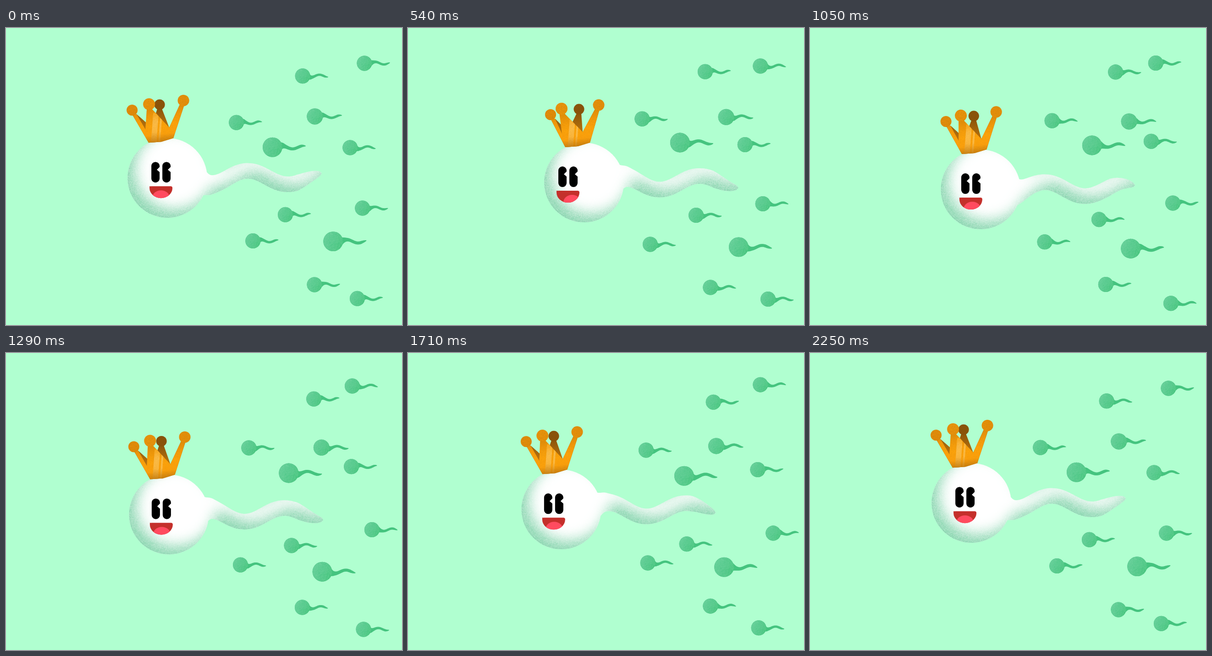
Recreate the animation shown at these times as an HTML page with a canvas. Size 864 by 648 pixels, loop 2280 ms.

```html
<!DOCTYPE html>
<html lang="en">
<head>
<meta charset="utf-8">
<title>Crowned swimmer</title>
<style>
  html, body { margin: 0; width: 100%; height: 100%; overflow: hidden; background: #b0ffd0; }
  canvas { display: block; }
</style>
</head>
<body>
<canvas id="stage" width="864" height="648"></canvas>
<script>
const TAU = Math.PI * 2, W = 864, H = 648, STEP = 30, LOOP = 2280, BEATS = 6;
const ctx = document.getElementById('stage').getContext('2d');
const layer = makeCanvas(W, H).getContext('2d');

function makeCanvas(w, h) {
  return Object.assign(document.createElement('canvas'), { width: w, height: h });
}

const clamp = k => Math.max(0, Math.min(1, k));
const ease = k => clamp(k) ** 2 * (3 - 2 * clamp(k));

// Repeating speckle of one colour with seeded random alpha
function grain(color) {
  const size = 128, g = makeCanvas(size, size).getContext('2d');
  const img = g.createImageData(size, size);
  let seed = 7;
  for (let i = 3; i < img.data.length; i += 4) {
    seed = (seed * 16807) % 2147483647;
    img.data[i] = seed / 2147483647 * 255;
  }
  g.putImageData(img, 0, 0);
  g.globalCompositeOperation = 'source-in';
  g.fillStyle = color;
  g.fillRect(0, 0, size, size);
  return ctx.createPattern(g.canvas, 'repeat');
}
const brownGrain = grain('#a86208'), mintGrain = grain('#8edcb0');

function gradient(x0, y0, x1, y1, ...colors) {
  const g = ctx.createLinearGradient(x0, y0, x1, y1);
  colors.forEach((color, i) => g.addColorStop(i / (colors.length - 1), color));
  return g;
}

function polygon(points) {
  const path = new Path2D();
  points.forEach(([x, y], i) => i ? path.lineTo(x, y) : path.moveTo(x, y));
  path.closePath();
  return path;
}

function grained(path, fill, speckle, strength) {
  ctx.fillStyle = fill;
  ctx.fill(path);
  ctx.globalAlpha = strength;
  ctx.fillStyle = speckle;
  ctx.fill(path);
  ctx.globalAlpha = 1;
}

// Flat elliptical drift shared by all swimmers
function drift(x, y, reach, turns) {
  const a = TAU * turns;
  return [x + reach * Math.cos(a), y + reach / 2 * Math.sin(a + 0.13)];
}

// Round head plus a tail that carries a travelling wave
function swimmer(r, { len, wave, amp, half, neck }, phase) {
  const top = [], bottom = [], x0 = 0.71 * r, n = 70;
  for (let i = 0; i <= n; i++) {
    const x = x0 + (len - x0) * i / n;
    const a = TAU * (x / wave - phase);
    const swing = amp * ease((x - x0) / (0.4 * r)) * (1 - 0.27 * (x / len) ** 3);
    const mid = -swing * Math.cos(a), slope = swing * TAU / wave * Math.sin(a);
    const tip = Math.sqrt(clamp((len - x) / (0.16 * len)));
    const h = half * Math.hypot(1, slope) * tip + 0.52 * r * Math.exp((x0 - x) / neck);
    top.push([x, mid - h]);
    bottom.unshift([x, mid + h]);
  }
  const path = polygon([...top, ...bottom]);
  path.moveTo(r, 0);
  path.arc(0, 0, r, 0, TAU);
  return path;
}

// Centre of drift, delay in turns, optional scale
const crowd = [
  [658, 101, 0.61], [768, 76, 0], [516, 205, 0.55],
  [684, 199, 0.37, 1.06], [599, 259, 0.54, 1.3], [749, 254, 0.77],
  [619, 413, 0.37], [786, 388, 0.65], [525, 465, 0.03],
  [705, 473, 0.17, 1.3], [659, 559, 0], [776, 596, 0.37]
];

function drawSmall([cx, cy, delay, scale = 1], p) {
  const turns = p - delay, r = 16.5;
  const path = swimmer(r, { len: 56, wave: 38, amp: 3, half: 2.5, neck: 4.4 }, BEATS * turns + 0.63);
  const head = new Path2D();
  head.arc(0, 0, r, 0, TAU);
  ctx.save();
  ctx.translate(...drift(cx, cy, 14 * scale, turns));
  ctx.scale(scale, scale);
  ctx.fillStyle = '#45c47f';
  ctx.fill(path);
  grained(head, gradient(-r, -r / 2, r, r / 2, '#60ce96', '#50c889', '#42c47a'), mintGrain, 0.35);
  ctx.restore();
}

function drawBody(x, y, p) {
  const path = swimmer(87, { len: 337, wave: 176, amp: 16, half: 17, neck: 14 }, BEATS * p);
  layer.clearRect(0, 0, W, H);
  layer.save();
  layer.translate(x, y);
  layer.fillStyle = '#78d0a4';
  layer.fill(path);
  layer.globalCompositeOperation = 'destination-out';
  layer.save();
  layer.translate(16, -18);
  layer.filter = 'blur(15px)';
  layer.fill(path);
  layer.restore();
  layer.globalAlpha = 0.4;
  layer.fillStyle = mintGrain;
  layer.fillRect(-100, -100, 460, 200);
  layer.restore();

  ctx.save();
  ctx.translate(x, y);
  ctx.fillStyle = '#fff';
  ctx.fill(path);
  ctx.restore();
  ctx.drawImage(layer.canvas, 0, 0);
}

function drawCrown(turn) {
  const left = [-77 + 4 * turn, -148], right = [35 - 3 * turn, -169];
  const front = [-40 - 9 * turn, -161], back = [-17 + 6 * turn, -160];
  const dip = [4 - 7 * turn, -110];

  const spike = ([x, y], lean) => [[x + lean - 5, y + 9], [x + lean + 5, y + 9]];
  const band = (middle, leftDip) => polygon([[-41, -77], ...spike(left, 5), leftDip,
    ...spike(middle, 0), dip, ...spike(right, -3), [13, -87], [-13, -79]]);
  const ball = ([x, y], r, color) => {
    const path = new Path2D();
    path.arc(x, y, r, 0, TAU);
    grained(path, color, brownGrain, 0.3);
  };

  grained(band(back, [-35, -111]), gradient(0, -155, 0, -100, '#84500a', '#c47d10'), brownGrain, 0.3);
  ball(back, 11.5, '#84500a');

  const face = band(front, [-48, -106]);
  ctx.fillStyle = gradient(0, -160, 10, -78, '#dc8c0a', '#f29a0a', '#ffa50a', '#ffa30c', '#bd7810');
  ctx.fill(face);
  ctx.save();
  ctx.clip(face);
  ctx.fillStyle = gradient(0, -145, 0, -78, '#fba818', '#ffc04a', '#ffbc42', '#cc8618');
  for (const [x, w] of [[-36, 12], [-20, 4]]) {
    ctx.fill(polygon([[x, -74], [x + 5, -142], [x + 5 + w, -142], [x + w, -74]]));
  }
  ctx.restore();
  grained(face, 'transparent', brownGrain, 0.15);

  ball(left, 12, '#e6900a');
  ball(front, 13, '#ee980c');
  ball(right, 12.5, '#ea940a');
}

function drawFace(turn) {
  ctx.save();
  ctx.translate(-21 * turn, 0);
  for (const x of [-35, -11]) {
    ctx.fillStyle = '#000';
    ctx.beginPath();
    ctx.roundRect(x, -35, 18, 45, 9);
    ctx.fill();
    ctx.fillStyle = '#fff';
    ctx.fill(polygon([[x + 12, -18], [x + 19, -25], [x + 19, -12]]));
  }
  ctx.beginPath();
  ctx.roundRect(-39, 18, 50, 5, [4, 4, 0, 0]);
  ctx.ellipse(-14, 22, 25, 22, 0, 0, Math.PI);
  ctx.fillStyle = '#c4302b';
  ctx.fill();
  ctx.clip();
  ctx.beginPath();
  ctx.ellipse(-14 + 9 * turn, 43, 19, 16, 0, 0, TAU);
  ctx.fillStyle = '#ff4b5f';
  ctx.fill();
  ctx.restore();
}

// Quick turn away, hold, slow return with a little left over until the end
function turnAt(ms) {
  return ease(ms / 210) * (1 - 0.88 * ease((ms - 550) / 750)) * (1 - ease((ms - 1900) / 350));
}

function draw() {
  const ms = Math.floor(performance.now() % LOOP / STEP) * STEP;
  const p = ms / (LOOP - STEP), turn = turnAt(ms);
  const [x, y] = drift(359.7, 340, 26, p - 0.297);
  ctx.fillStyle = '#b0ffd0';
  ctx.fillRect(0, 0, W, H);
  for (const one of crowd) drawSmall(one, p);
  drawBody(x, y, p);
  ctx.save();
  ctx.translate(x, y);
  drawCrown(turn);
  drawFace(turn);
  ctx.restore();
  requestAnimationFrame(draw);
}
draw();
</script>
</body>
</html>
```
